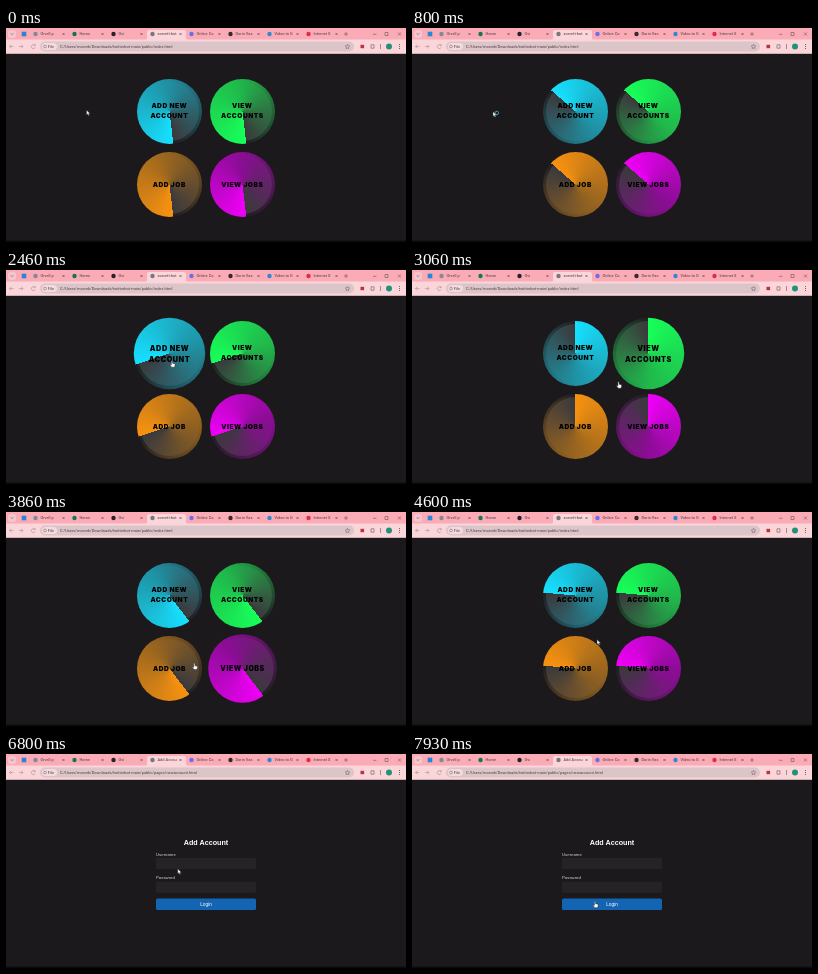
Write an HTML page that moves like this. It is 400 by 214 pixels and loops after 8000 ms.

```html
<!DOCTYPE html>
<html lang="en">
<head>
<meta charset="utf-8">
<title>Account manager</title>
<style>
  html, body { margin: 0; width: 100%; height: 100%; overflow: hidden; background: #1b191b; }
  #stage { position: relative; width: 400px; height: 214px; overflow: hidden; }
  svg { position: absolute; left: 0; top: 0; }
  text { font-family: Roboto, Arial, sans-serif; font-size: 3.97px; fill: #4a3a3d; }
  .disc {
    position: absolute; width: 65px; height: 65px; border-radius: 50%;
    display: flex; align-items: center; justify-content: center; text-align: center;
    font: 900 6.6px/10px Inter, sans-serif; letter-spacing: .5px; color: #000; white-space: pre;
    background: conic-gradient(from var(--angle), var(--color), var(--middle), #201f22);
  }
  .disc::before {
    content: ""; position: absolute; inset: 3px; border-radius: 50%; z-index: -1;
    background: conic-gradient(from var(--angle), var(--color), var(--middle), #3a393c);
  }
  #form text { font-family: "Liberation Sans", Arial, sans-serif; font-size: 4.3px; fill: #d8d6d8; }
  #form .title { font-size: 7.2px; font-weight: 700; fill: #fff; }
  #form .login { font-size: 4.8px; fill: #fff; }
</style>
</head>
<body>
<div id="stage">
  <svg width="400" height="214" viewBox="0 0 400 214">
    <rect width="400" height="214" fill="#1b191b"/>
    <rect y="212.6" width="400" height="1.4" fill="#0c0b0c"/>
    <rect width="400" height="12" fill="#fbabb5"/>
    <rect y="11.5" width="400" height="14.3" fill="#fad5d9"/>
    <path d="M139 12q2 0 2-2V4q0-2 2-2h35q2 0 2 2v6q0 2 2 2z" fill="#fad5d9"/>
    <rect x="34" y="13.6" width="314" height="9.8" rx="4.9" fill="#dcc5c8"/>
    <rect x="36" y="15" width="15" height="7" rx="3.5" fill="#f4dade"/>
    <rect x="2" y="2" width="8" height="8" rx="2.5" fill="#f5c5cc"/>
    <rect x="15.7" y="3.7" width="4.6" height="4.6" fill="#2586d8"/>
    <g id="tabs"></g>
    <g fill="none" stroke="#6d555a" stroke-width=".6">
      <path d="M4.6 5.3l1.4 1.4 1.4-1.4M338 6h4M340 4v4"/>
      <path d="M367 6.3h3.4M379 4.5h3v3h-3zM392 4.5l3 3m0-3l-3 3"/>
      <path d="M365 16.8h3v3.4h-3zM374.5 16v5"/>
      <circle cx="39" cy="18.5" r="1.4" stroke-width=".5"/>
      <path d="M341.5 16.3l.7 1.5 1.6.2-1.2 1.1.3 1.6-1.4-.8-1.4.8.3-1.600-1.200-1.100 1.600-.2z" stroke-width=".5"/>
    </g>
    <path d="M7.500 18.500H3.500m1.800-1.800l-1.800 1.800 1.800 1.800M13 18.500h4m-1.800-1.800l1.800 1.800-1.800 1.800M29 17.500a2 2 0 1 0 .2 1.800M29.200 16v1.600h-1.600"
      fill="none" stroke="#a98e93" stroke-width=".6"/>
    <rect x="354.500" y="16.800" width="3.600" height="3.400" fill="#b8343c"/>
    <circle cx="383" cy="18.500" r="3" fill="#23917a"/>
    <g fill="#4b383c"><circle cx="393.500" cy="16.600" r=".5"/><circle cx="393.500" cy="18.500" r=".5"/><circle cx="393.500" cy="20.400" r=".5"/></g>
    <text x="41.800" y="19.900">File</text>
    <text id="url" x="54" y="19.900"></text>
    <g id="form">
      <text class="title" x="200" y="90.500" text-anchor="middle">Add Account</text>
      <text x="150" y="102">Username</text>
      <rect x="150" y="104" width="100" height="11" rx="1" fill="#252325"/>
      <text x="150" y="125">Password</text>
      <rect x="150" y="127.700" width="100" height="11" rx="1" fill="#252325"/>
      <rect x="150" y="144.500" width="100" height="11.500" rx="1.500" fill="#1464b4"/>
      <text class="login" x="200" y="152" text-anchor="middle">Login</text>
    </g>
  </svg>
  <div id="discs"></div>
  <svg width="400" height="214" viewBox="0 0 400 214">
    <g id="cursor" fill="#fff" stroke="#222" stroke-width=".45" stroke-linejoin="round">
      <path id="arrow" d="M0 0v5l1.200-1 .8 1.800.9-.4-.8-1.700h1.600z"/>
      <path id="hand" d="M-.6 0q.6-.7 1.200 0v2.200l2.100.6q.6.3.5 1.100l-.6 2.300h-2.900l-1.800-2.400q.3-.8 1.500.2z"/>
      <circle id="busy" cx="3.800" cy="1.500" r="1.700" fill="none" stroke="#4ba4cc" stroke-width=".9"/>
    </g>
  </svg>
</div>
<script>
const LOOP = 8000, NAVIGATE = 5500, LOADED = 5800, FADE = 240;
const $ = id => document.getElementById(id);
const clamp = v => Math.max(0, Math.min(1, v));
const smooth = v => v * v * (3 - 2 * v);

// Tab icon colour and title, laid out at a fixed pitch.
const tabs = [
  ['#7d8a98', 'Orvell p'], ['#12745b', 'Home'], ['#25212a', 'Ovi'], ['#77777d', ''],
  ['#6670e8', 'Online Co'], ['#332a30', 'Dorin Vas'], ['#3288d0', 'Video to G'], ['#dd2d4c', 'Internet S']
];
$('tabs').innerHTML = tabs.map(([color, title], i) => {
  const x = 29.5 + i * 39;
  return `<circle cx="${x}" cy="6" r="2.2" fill="${color}"/>
    <text x="${x + 5}" y="7.4">${title}</text>
    <path d="M${x + 27} 5l2 2m0-2l-2 2" stroke="#4b383c" stroke-width=".55"/>`;
}).join('');
const activeTitle = $('tabs').querySelectorAll('text')[3];

// Each disc lists the spans of time in which it is hovered.
const discs = [
  { x: 163.3, y: 83.2, color: '#16e0ff', middle: '#1f92a4', label: 'ADD NEW\nACCOUNT', hover: [[1500, 2600], [4950, 6000]] },
  { x: 236.3, y: 83.2, color: '#17ff59', middle: '#20b84b', label: 'VIEW\nACCOUNTS', hover: [[2680, 3150]] },
  { x: 163.3, y: 156.8, color: '#f8920f', middle: '#99651f', label: 'ADD JOB', hover: [[3850, 4330]] },
  { x: 236.3, y: 156.8, color: '#ee00f6', middle: '#8c0c96', label: 'VIEW JOBS', hover: [[3250, 3750]] }
];
for (const disc of discs) {
  const el = disc.el = document.createElement('div');
  el.className = 'disc';
  el.textContent = disc.label;
  el.style.left = disc.x - 32.5 + 'px';
  el.style.top = disc.y - 32.5 + 'px';
  el.style.setProperty('--color', disc.color);
  el.style.setProperty('--middle', disc.middle);
  $('discs').append(el);
}

const angleKeys = [[0, 173], [800, 311], [1860, 504], [3060, 719], [4600, 995], [5660, 1170], [8000, 1590]];
const cursorKeys = [
  [0, 80.5, 82], [900, 81, 83.5], [1500, 140, 92], [1860, 159.5, 95], [2500, 166, 91],
  [2800, 226, 92], [3060, 206.5, 112], [3350, 225, 148], [3700, 221, 150], [3950, 175, 152],
  [4300, 168, 148], [4600, 185, 127.5], [5000, 177, 107], [5400, 168.5, 99.5],
  [6300, 168.5, 99.5], [6900, 172, 116], [7500, 183, 147.5], [8000, 183, 147.5]
];

function track(keys, t, ease = v => v) {
  const i = Math.max(1, keys.findIndex(k => k[0] > t));
  const a = keys[i - 1], b = keys[i], p = ease((t - a[0]) / (b[0] - a[0]));
  return a.slice(1).map((v, n) => v + (b[n + 1] - v) * p);
}

const show = (id, on) => $(id).setAttribute('visibility', on ? 'visible' : 'hidden');

function draw(t) {
  const loaded = t >= LOADED;
  const [angle] = track(angleKeys, t);
  $('discs').style.display = loaded ? 'none' : 'block';
  $('discs').style.setProperty('--angle', angle + 'deg');
  for (const { el, hover } of discs) {
    const amount = Math.max(...hover.map(([from, to]) =>
      smooth(clamp((t - from) / FADE) - clamp((t - to) / FADE))));
    el.style.transform = `scale(${1 + .1 * amount})`;
  }
  show('form', loaded);

  const page = t < NAVIGATE ? 'index.html' : 'pages/newaccount.html';
  $('url').textContent = 'C:/Users/morvek/Downloads/twitterbot-main/public/' + page;
  activeTitle.textContent = loaded ? 'Add Accou' : t < NAVIGATE ? 'zorvett-bot' : 'newaccoun';

  const [x, y] = track(cursorKeys, t, smooth);
  const onDisc = t < NAVIGATE && discs.some(d => d.hover.some(([from, to]) => t >= from && t < to));
  const pointing = onDisc || loaded && y > 144;
  $('cursor').setAttribute('transform', `translate(${x} ${y})`);
  show('hand', pointing);
  show('arrow', !pointing);
  show('busy', t > 500 && t < 1000);
}

const start = performance.now();
function frame() {
  draw((performance.now() - start) % LOOP);
  requestAnimationFrame(frame);
}
frame();
</script>
</body>
</html>
```
